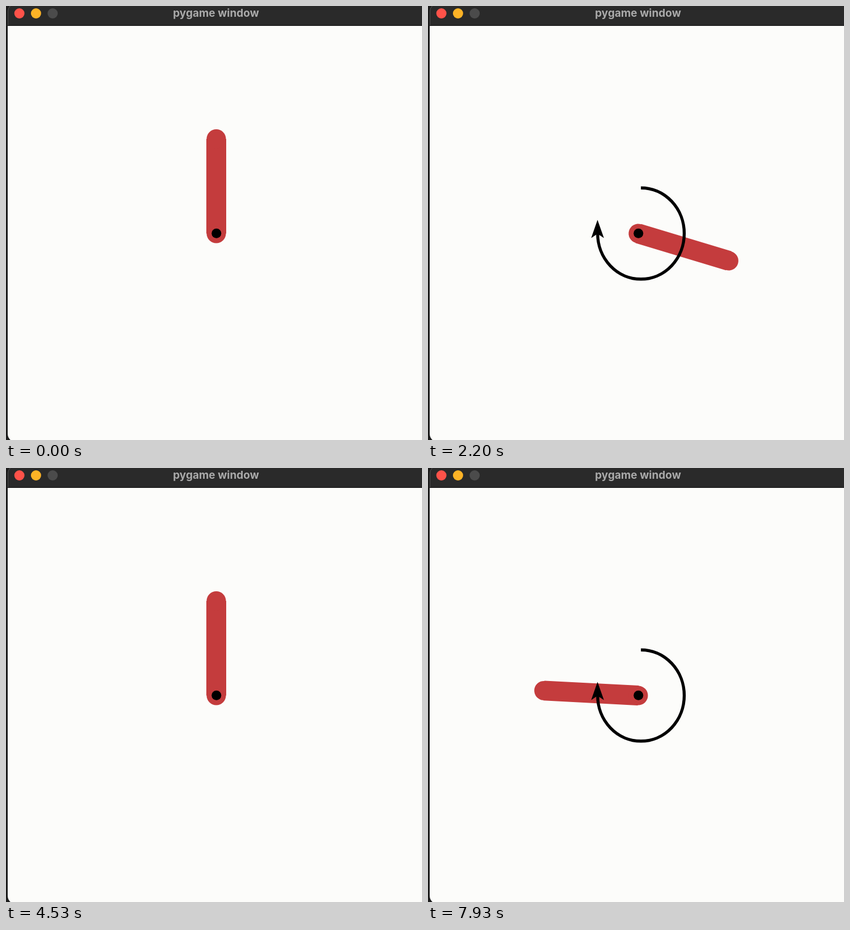
An HTML page with a canvas that plays this animation: 733 px wide and 764 px high, repeating every 8000 ms.

```html
<!DOCTYPE html>
<html lang="en">
<head>
<meta charset="utf-8">
<title>pygame window</title>
<style>
  html, body { margin: 0; width: 100%; height: 100%; overflow: hidden; background: #fcfcfa; }
  canvas { display: block; }
</style>
</head>
<body>
<canvas id="stage" width="733" height="764"></canvas>
<script>
const ctx = document.getElementById('stage').getContext('2d');
const LOOP = 8000;
const PIVOT = { x: 370.5, y: 400.5 };
const ROD = 166.5;
const RAD = Math.PI / 180;
const PAPER = '#fcfcfa', RED = '#c43c3d', INK = '#000';

const RELEASE = 600;    // the rod is dropped
const CATCH = 2670;     // the last swing turns into a balanced approach
const SETTLED = 4500;
const RESTART = 7470;   // a new drop that repeats the last swing
const REPLAY = 5305;

// Turning points of the swing; angles are counter-clockwise from upright
const TURNS = [
  { at: 440, angle: 165 },
  { at: 830, angle: 187 },
  { at: 1350, angle: 127 },
  { at: 2175, angle: 254 },
  { at: 2817, angle: 44 }
];

// Half a cosine between turning points, with the torque pushing along
function swing(t) {
  const i = Math.max(1, TURNS.findIndex(turn => turn.at > t));
  const from = TURNS[i - 1], to = TURNS[i];
  const ease = (1 - Math.cos(Math.PI * (t - from.at) / (to.at - from.at))) / 2;
  return {
    angle: from.angle + (to.angle - from.angle) * ease,
    torque: to.angle > from.angle ? 1.68 : -2
  };
}

// A pendulum creeping up to its unstable balance, with fading torque
function approach(dt) {
  return {
    angle: 1 + 4 * Math.atan(0.309 * Math.exp(-dt / 193)) / RAD,
    torque: -1.96 * Math.exp(-dt / 362)
  };
}

function pose(t) {
  if (t >= RESTART) return swing(t - REPLAY);
  if (t < RELEASE || t >= SETTLED) return { angle: 0, torque: 0 };
  return t < CATCH ? swing(t) : approach(t - CATCH);
}

function disc(x, y, r, color) {
  ctx.fillStyle = color;
  ctx.beginPath();
  ctx.arc(x, y, r, 0, 2 * Math.PI);
  ctx.fill();
}

function drawWindow() {
  ctx.fillStyle = '#1c1c1c';
  ctx.fillRect(0, 0, 733, 764);

  ctx.save();
  ctx.beginPath();
  ctx.roundRect(3, -6, 760, 774, 15);
  ctx.clip();
  ctx.fillStyle = '#2a2a2a';
  ctx.fillRect(0, 0, 733, 34);
  ctx.fillStyle = '#0c0c0c';
  ctx.fillRect(0, 34, 733, 1);
  ctx.fillStyle = PAPER;
  ctx.fillRect(0, 35, 733, 729);
  ctx.restore();

  ctx.strokeStyle = '#505050';
  ctx.lineWidth = 1;
  ctx.beginPath();
  ctx.moveTo(3.5, 34);
  ctx.lineTo(3.5, 9);
  ctx.quadraticCurveTo(3.8, 3, 7.5, 0);
  ctx.stroke();

  ['#ff5249', '#fdb326', '#4b4b4b'].forEach((color, i) =>
    disc(23.6 + 29.3 * i, 13, 9, color));

  ctx.fillStyle = '#a9a9a9';
  ctx.font = '700 19px Inter, sans-serif';
  ctx.textAlign = 'center';
  ctx.fillText('pygame window', 370, 19);
}

function drawRod(angle) {
  ctx.save();
  ctx.translate(PIVOT.x, PIVOT.y);
  ctx.rotate(-angle * RAD);
  ctx.fillStyle = RED;
  ctx.fillRect(-17.5, -ROD, 35, ROD);
  disc(0, 0, 17, RED);
  disc(0, -ROD, 17, RED);
  ctx.restore();
}

function drawArrow(torque) {
  const size = Math.abs(torque) / 2;
  if (size < 0.01) return;
  ctx.save();
  ctx.translate(PIVOT.x, PIVOT.y);
  ctx.scale(torque > 0 ? -size : size, size);
  ctx.strokeStyle = ctx.fillStyle = INK;
  ctx.lineWidth = 5.4;
  ctx.beginPath();
  ctx.ellipse(4.7, 0, 76.3, 80.3, 0, -Math.PI / 2, Math.PI);
  ctx.stroke();
  ctx.beginPath();
  ctx.moveTo(-71.8, -24);
  ctx.lineTo(-60.5, 8);
  ctx.lineTo(-71.8, 0.5);
  ctx.lineTo(-83, 8);
  ctx.fill();
  ctx.restore();
}

function draw(t) {
  const { angle, torque } = pose(t);
  drawWindow();
  drawRod(angle);
  drawArrow(torque);
  disc(PIVOT.x + 0.3, PIVOT.y - 0.2, 8.5, INK);
}

// 15 pictures per second, on times rounded to 10 ms
function snap(t) {
  const r = t % 200;
  return t - r + (r < 70 ? 0 : r < 130 ? 70 : 130);
}

const start = performance.now();
function tick() {
  draw(snap((performance.now() - start) % LOOP));
  requestAnimationFrame(tick);
}
tick();
</script>
</body>
</html>
```
